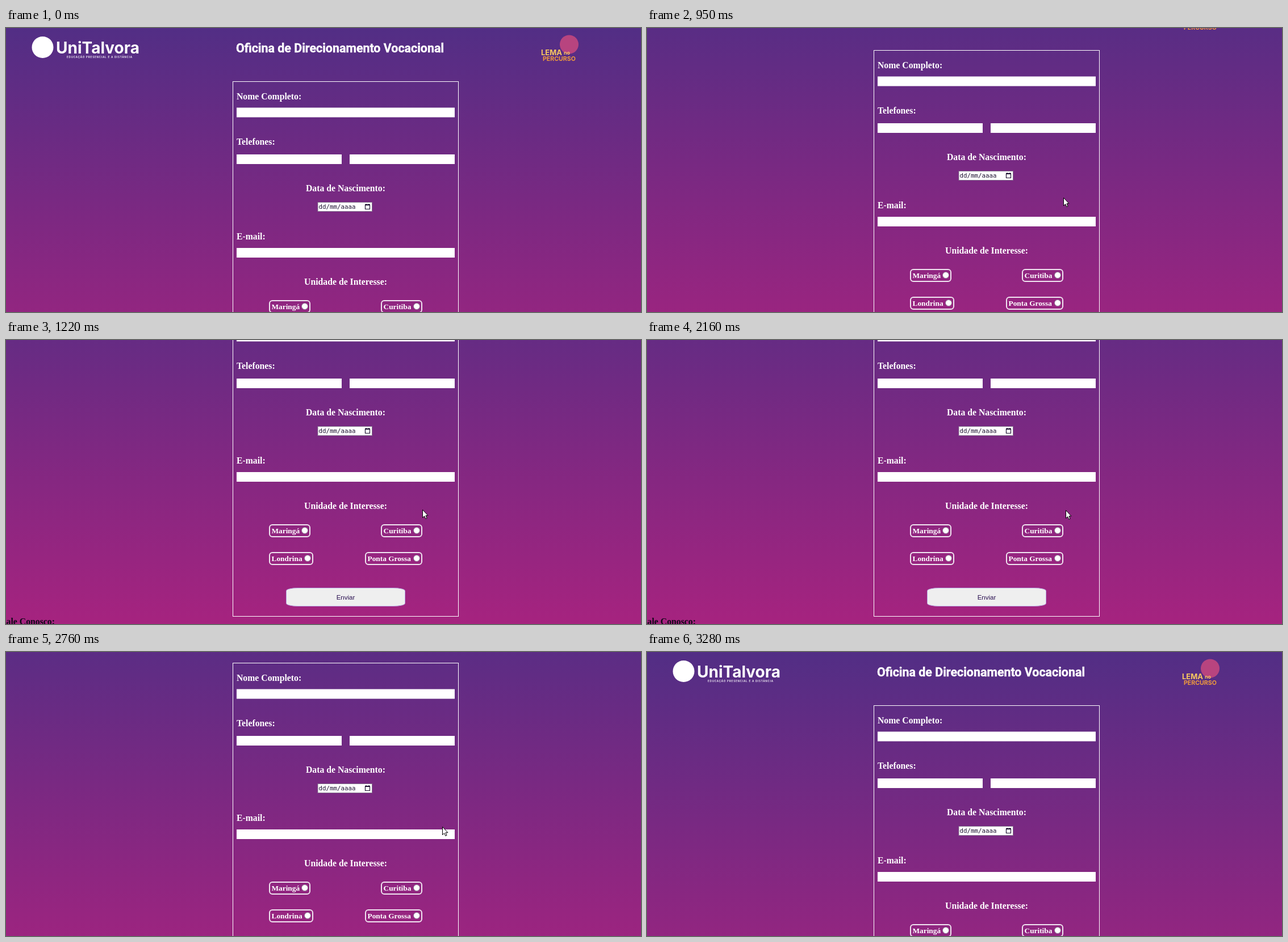
An HTML page that plays this animation: 1118 px wide and 501 px high, repeating every 4080 ms.

```html
<!DOCTYPE html>
<html lang="pt-BR">
<head>
<meta charset="utf-8">
<title>Formulário</title>
<style>
  html, body { margin: 0; width: 100%; height: 100%; overflow: hidden; background: #522e85; }
  svg { display: block; width: 1118px; height: 501px; }
  .serif { font: bold 15.75px "Liberation Serif", "Times New Roman", serif; fill: #fff; }
  .option { font-size: 13.33px; }
  .mid { text-anchor: middle; }
  .logo { font-family: Inter, sans-serif; font-weight: 700; fill: #fff; }
  .tagline { font-size: 4.6px; font-weight: 600; letter-spacing: .78px; }
  .title { font: bold 21.4px Roboto, sans-serif; fill: #fff; stroke: #fff; stroke-width: .4px; }
  .date { font: 10.8px "DejaVu Sans Mono", monospace; fill: #1c1030; }
  .send { font: 11.5px "Liberation Sans", Arial, sans-serif; fill: #2a1050; }
</style>
</head>
<body>
<svg viewBox="0 0 1118 501">
  <defs>
    <linearGradient id="bg" x1="0" y1="0" x2="0" y2="1">
      <stop offset="0" stop-color="#522e85"/>
      <stop offset="1" stop-color="#a6237f"/>
    </linearGradient>
  </defs>
  <g id="page">
    <rect width="1118" height="656" fill="url(#bg)"/>

    <circle cx="64.5" cy="34" r="19" fill="#fff"/>
    <text class="logo" x="88" y="45" font-size="28">UniTalvora</text>
    <text class="logo tagline" x="107" y="53">EDUCAÇÃO PRESENCIAL E A DISTÂNCIA</text>
    <text class="title mid" x="588" y="43">Oficina de Direcionamento Vocacional</text>
    <circle cx="991.5" cy="29" r="16.5" fill="#b8447f"/>
    <g class="logo">
      <text x="942" y="47.5" font-size="13" style="fill:#f8c860">LEMA</text>
      <text x="982" y="46.5" font-size="9" style="fill:#f8c860">no</text>
      <text x="945" y="58" font-size="10.6" style="fill:#f09a3c">PERCURSO</text>
    </g>

    <rect x="399.5" y="94.5" width="397" height="548" fill="none" stroke="#fff"/>
    <g class="serif">
      <text x="406" y="126">Nome Completo:</text>
      <text x="406" y="206">Telefones:</text>
      <text class="mid" x="598" y="288">Data de Nascimento:</text>
      <text x="406" y="373">E-mail:</text>
      <text class="mid" x="598" y="453">Unidade de Interesse:</text>
      <text x="-9" y="657" fill="#100818">Fale Conosco:</text>
    </g>
    <g fill="#fff">
      <rect x="406" y="140.5" width="384" height="17"/>
      <rect x="406" y="223" width="185" height="17"/>
      <rect x="605" y="223" width="185" height="17"/>
      <rect x="406" y="388" width="384" height="17"/>
    </g>

    <rect x="549" y="307.5" width="95.5" height="16" fill="#fff" stroke="#85758f"/>
    <text class="date" x="550.5" y="319">dd/mm/aaaa</text>
    <path d="M632.5 312.5h8v7h-8zM632 311.5h9M634 310v2M639 310v2" fill="none" stroke="#1c1030" stroke-width="1.2"/>

    <g id="options"></g>

    <path d="M514 592.5H682A20.5 5 0 0 1 702.5 597.5V619.5A20.5 5 0 0 1 682 624.5H514A20.5 5 0 0 1 493.5 619.5V597.5A20.5 5 0 0 1 514 592.5Z" fill="#efefef" stroke="#b9a5e0"/>
    <text class="send mid" x="598" y="613">Enviar</text>
  </g>
  <path id="cursor" d="M.5 .5V14.5L3.7 11.6L5.8 16.4L8 15.4L6 10.7H10Z" fill="#fff" stroke="#000" stroke-linejoin="round"/>
</svg>
<script>
  const LOOP = 4080;
  const SCROLL = 155;
  const AWAY = { x: 1118, y: 518 };
  const page = document.getElementById('page');
  const cursor = document.getElementById('cursor');

  // Two options per row: label, left edge, right edge
  const options = [
    ['Maringá', 463, 536], ['Curitiba', 660, 733],
    ['Londrina', 463, 541], ['Ponta Grossa', 632, 733]
  ];
  document.getElementById('options').innerHTML = options.map(([label, left, right], i) => {
    const top = 480 + 49 * Math.floor(i / 2);
    return `
    <rect x="${left + 1}" y="${top + 1}" width="${right - left - 2}" height="21" rx="5" fill="none" stroke="#f0e4f0" stroke-width="2"/>
    <text class="serif option" x="${left + 4.5}" y="${top + 16}">${label}</text>
    <circle cx="${right - 10}" cy="${top + 11}" r="5.5" fill="#fff" stroke="#8d7390"/>`;
  }).join('');

  // Progress 0..1 in even jumps; the first lands at start, the last at end
  function progress(t, start, end, steps) {
    const gap = (end - start) / (steps - 1);
    const done = Math.floor((t - start) / gap) + 1;
    return Math.min(Math.max(done / steps, 0), 1);
  }

  const smooth = p => p * p * (3 - 2 * p);
  const wheel = p => p + 0.145 * p * (1 - p) ** 2;

  // Pointer stops, each reached by an eased glide from the one before
  const glides = [
    { start: 70, end: 270, steps: 4, x: 747, y: 304 },
    { start: 410, end: 540, steps: 3, x: 733, y: 299 },
    { start: 2160, end: 2410, steps: 5, x: 768, y: 308 },
    { start: 2960, end: 3090, steps: 3, x: 936, y: 380 },
    { start: 3160, end: 3280, steps: 3, ...AWAY }
  ];

  function pointer(t) {
    let { x, y } = AWAY;
    for (const g of glides) {
      const p = smooth(progress(t, g.start, g.end, g.steps));
      x += (g.x - x) * p;
      y += (g.y - y) * p;
    }
    return [Math.round(x), Math.round(y)];
  }

  function scroll(t) {
    const down = wheel(progress(t, 870, 1220, 6));
    const up = wheel(progress(t, 2620, 2955, 6));
    return Math.round(SCROLL * (down - up));
  }

  function draw(t) {
    page.setAttribute('transform', `translate(0 ${-scroll(t)})`);
    cursor.setAttribute('transform', `translate(${pointer(t)})`);
  }

  const start = performance.now();
  function tick() {
    draw((performance.now() - start) % LOOP);
    requestAnimationFrame(tick);
  }
  tick();
</script>
</body>
</html>
```
